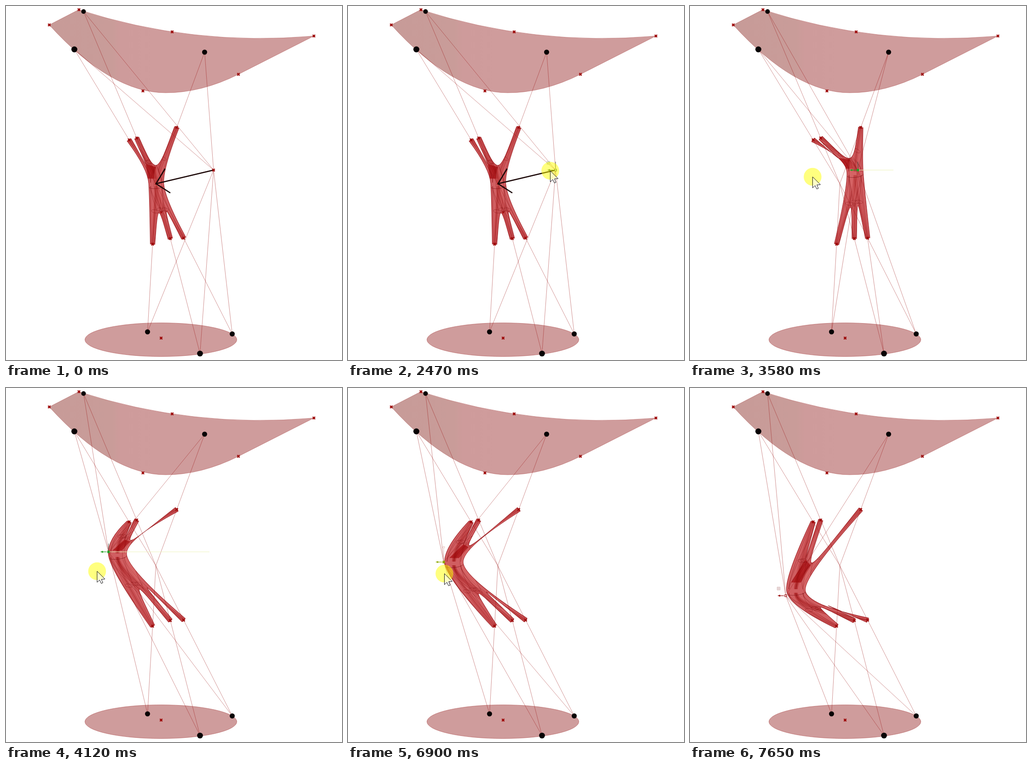
An HTML page with a canvas that plays this animation: 730 by 767 pixels, repeating every 8000 ms.

```html
<!DOCTYPE html>
<html>
<head>
<meta charset="utf-8">
<style>
html, body { margin: 0; width: 100%; height: 100%; overflow: hidden; background: #fff; }
canvas { display: block; }
</style>
</head>
<body>
<canvas id="stage" width="730" height="767"></canvas>
<script>
const g = document.getElementById('stage').getContext('2d');
const LOOP = 8000;
const RED = '#9c0404', THIN = 'rgba(150,8,8,.55)';

const center = [325.5, 385];
const anchors = [[148.5, 94], [168.5, 12], [431.5, 100], [491.5, 710.5], [421.5, 753], [307.5, 706]];
const anchorSize = [6.5, 5, 5.5, 5.5, 6.3, 5.5];
// clockwise: three upper limbs, then three lower ones
const tips = [[267.5, 290], [284, 286], [371, 263], [386, 503], [357, 504], [318.5, 516]];
const tipMean = [330.5, 393.7];
const canopyMarks = [[94, 41], [158.5, 8], [361, 56], [669, 65], [505, 148], [297.5, 184], [337, 719.5]];

// [time, x, y]
const cursorKeys = [[1490, 649, 453], [2270, 427, 357], [2400, 441, 357], [2540, 438, 357], [3580, 266.5, 370],
  [4120, 198, 397], [4260, 190, 398], [4720, 546, 442], [5600, 546, 442], [6340, 205, 335],
  [6410, 205, 336], [6900, 209.5, 402], [7300, 209, 430]];
const handleKeys = [[2470, 451, 355.5], [3100, 415, 355.5], [3580, 365, 355.5], [4120, 223, 355], [4190, 208, 355],
  [6410, 208, 355], [6900, 208, 377], [7250, 208, 420], [7640, 208, 450]];

const lerp = (a, b, k) => [a[0] + (b[0] - a[0]) * k, a[1] + (b[1] - a[1]) * k];
const shift = (p, x, y) => [p[0] + x, p[1] + y];
const smooth = k => k * k * (3 - 2 * k);

function track(keys, t, ease = k => k) {
  if (t <= keys[0][0]) return keys[0].slice(1);
  for (let i = 1; i < keys.length; i++) {
    const a = keys[i - 1], b = keys[i];
    if (t < b[0]) return lerp(a.slice(1), b.slice(1), ease((t - a[0]) / (b[0] - a[0])));
  }
  return keys[keys.length - 1].slice(1);
}

function stroke(color, width = 1) {
  g.strokeStyle = color;
  g.lineWidth = width;
  g.stroke();
}

function line(points, color, width) {
  g.beginPath();
  points.forEach(p => g.lineTo(...p));
  stroke(color, width);
}

function disc(p, r, color) {
  g.beginPath();
  g.arc(...p, r, 0, 7);
  g.fillStyle = color;
  g.fill();
}

function cross(p, r = 2.6, width = 2.3) {
  line([shift(p, -r, -r), shift(p, r, r)], RED, width);
  line([shift(p, -r, r), shift(p, r, -r)], RED, width);
}

function drawSurfaces() {
  const shade = g.createLinearGradient(94, 0, 330, 0);
  shade.addColorStop(0, '#c79b98');
  shade.addColorStop(.58, '#c99c99');
  shade.addColorStop(.66, '#ce9b9b');
  shade.addColorStop(1, '#cf9c9c');
  g.beginPath();
  g.moveTo(94, 41);
  g.lineTo(158, 8);
  g.quadraticCurveTo(405, 88, 669, 65);
  g.lineTo(505, 148);
  g.quadraticCurveTo(425, 188, 347, 188);
  g.quadraticCurveTo(228, 188, 94, 41);
  g.fillStyle = shade;
  g.fill();
  stroke('rgba(165,60,60,.6)', .8);
  g.beginPath();
  g.ellipse(336.5, 723, 165, 36.5, 0, 0, 7);
  g.fillStyle = '#cf9c9c';
  g.fill();
  stroke('rgba(165,60,60,.7)', .8);
}

function drawBody(pull) {
  const hub = lerp(pull, tipMean, .18);
  const half = 16 + .04 * Math.hypot(hub[0] - tipMean[0], hub[1] - tipMean[1]);
  const left = shift(hub, -half, -2), right = shift(hub, half, -2);

  // both corners of a limb's end, in clockwise order
  const corners = tips.map(p => {
    const dx = hub[0] - p[0], dy = hub[1] - p[1], k = 5 / Math.hypot(dx, dy);
    return [shift(p, -dy * k, dx * k), shift(p, dy * k, -dx * k)]
      .sort((a, b) => 0) && [shift(p, dy * -k, dx * k), shift(p, dy * k, dx * -k)];
  });
  const fork = (i, k) => lerp(hub, lerp(tips[i], tips[i + 1], .5), k);
  const forks = { 0: fork(0, .45), 1: fork(1, .37), 3: fork(3, .5), 4: fork(4, .5) };

  const intoFork = (i, a, b) => {
    const k = [0, 1].map(n => (forks[i][n] - (a[n] + b[n]) / 8) * 4 / 3);
    g.bezierCurveTo(...k, ...k, ...b);
  };
  const aroundWaist = (waist, lean, end) => {
    g.quadraticCurveTo(waist[0] - lean, waist[1] - 32, ...waist);
    g.quadraticCurveTo(waist[0] + lean, waist[1] + 32, ...end);
  };

  g.beginPath();
  g.moveTo(...corners[0][0]);
  tips.forEach((_, i) => {
    const from = corners[i][1], to = corners[(i + 1) % 6][0];
    g.lineTo(...from);
    if (i === 2) aroundWaist(right, 2, to);
    else if (i === 5) {
      g.quadraticCurveTo(left[0] + 2, left[1] + 32, ...left);
      g.quadraticCurveTo(left[0] - 2, left[1] - 32, ...to);
    } else intoFork(i, from, to);
  });
  g.closePath();
  g.fillStyle = 'rgba(194,44,48,.76)';
  g.fill();
  stroke('rgba(150,14,18,.85)', 1.1);

  g.save();
  g.clip();
  g.beginPath();
  [forks[0], lerp(forks[1], hub, .1), lerp(hub, forks[1], .3), lerp(left, forks[0], .25)].forEach(p => g.lineTo(...p));
  g.fillStyle = 'rgba(165,8,12,.7)';
  g.fill();

  // shaded limbs with lengthwise mesh lines
  tips.forEach((tip, i) => {
    const sign = i < 3 ? -1 : 1;
    for (const side of [-1, 0, 1]) {
      const end = shift(hub, side * half * .75, sign * 4);
      g.beginPath();
      g.moveTo(...shift(tip, side * 2.6, 0));
      g.quadraticCurveTo(end[0], end[1] + sign * 30, ...end);
      if (!side) stroke('rgba(160,10,14,.2)', 8);
      stroke('rgba(130,8,12,.5)', .8);
    }
    const ring = lerp(tip, shift(hub, 0, sign * 25), .68);
    g.beginPath();
    g.ellipse(...ring, 8, 3.5, i === 2 ? .5 : .2, 0, 7);
    stroke('rgba(120,8,12,.5)', .8);
  });

  // spine highlight and waist seam
  const low = lerp(forks[3], forks[4], .5);
  g.beginPath();
  g.moveTo(...forks[1]);
  g.quadraticCurveTo(...right, ...low);
  g.quadraticCurveTo(...left, ...forks[1]);
  g.fillStyle = 'rgba(222,112,112,.35)';
  g.fill();
  stroke('rgba(130,8,12,.5)', .8);
  g.beginPath();
  g.ellipse(hub[0], hub[1] + 4, half, 5, -.1, 0, Math.PI);
  stroke('rgba(110,8,12,.65)', .9);
  g.restore();
}

function drawHandle(p, t) {
  if (t < 1180) return cross(p);
  const sideDrag = t >= 2500 && t < 4260, downDrag = t >= 6410 && t < 7640;
  const color = sideDrag ? '#23a023' : downDrag ? '#8ea800' : t >= 7640 ? '#9c1414' : '#3c6b28';
  if (sideDrag) line([p, [442, p[1]]], '#eef3bd', 1);
  if (t < 4260) line([shift(p, 0, -18), shift(p, 0, -4)], '#4b5148', 1);
  if (downDrag) {
    line([shift(p, 0, -29), p], 'rgba(180,100,100,.4)', 1);
    g.beginPath();
    g.arc(p[0], p[1] - 32, 2, 0, 7);
    stroke('#d9a9a0', .8);
  }
  line([shift(p, -4, 0), shift(p, -15, 0)], color, 1.2);
  g.beginPath();
  [[-18, 0], [-12, -2.2], [-12, 2.2]].forEach(d => g.lineTo(...shift(p, ...d)));
  g.fillStyle = color;
  g.fill();
  g.fillStyle = sideDrag || downDrag ? color : '#fff';
  g.fillRect(p[0] - 2, p[1] - 2, 4, 4);
  g.strokeStyle = color;
  g.lineWidth = 1.3;
  g.strokeRect(p[0] - 2, p[1] - 2, 4, 4);
  if (!sideDrag && !downDrag) {
    const [x, y] = shift(p, -18.5, -18.5);
    g.strokeStyle = t >= 7640 ? '#c9a4a4' : t < 2500 ? '#9fb6a0' : '#a9adc0';
    g.lineWidth = .9;
    g.strokeRect(x, y, 6, 6);
    line([[x + 3, y], [x + 3, y + 6]], g.strokeStyle, .8);
    line([[x, y + 3], [x + 6, y + 3]], g.strokeStyle, .8);
  }
}

function drawCursor(t) {
  if (t < 1490 || t >= 7640) return;
  const pressed = t >= 2400 && t < 4260 || t >= 6340;
  const p = track(cursorKeys, t, pressed ? undefined : smooth);
  if (pressed) disc(p, 19.3, 'rgba(255,255,0,.5)');
  g.beginPath();
  [[0, 0], [0, 24], [5.5, 19], [9, 26.5], [12.5, 25], [9.3, 17.5], [17, 17]].forEach(d => g.lineTo(...shift(p, ...d)));
  g.closePath();
  g.fillStyle = pressed ? 'rgba(255,255,255,.55)' : '#fff';
  g.fill();
  stroke('#111', 1);
}

function draw(t) {
  const handle = track(handleKeys, t), idle = t < 2500;
  g.clearRect(0, 0, 730, 767);
  drawSurfaces();
  drawBody(idle ? center : handle);
  anchors.forEach((a, i) => {
    line([a, tips[i], center], THIN, .8);
    line([a, handle], THIN, .8);
  });
  anchors.forEach((a, i) => disc(a, anchorSize[i], '#080304'));
  [...canopyMarks, ...tips].forEach(p => cross(p));
  if (idle) {
    cross(center, 2, 1.5);
    cross([337, 447], 2, 1.5);
    line([[451, 355.5], [326, 385]], '#1c0808', 2.8);
    line([[345.5, 352.5], [326, 385], [357, 405]], '#1c0808', 2.6);
  }
  drawHandle(handle, t);
  drawCursor(t);
}

function tick() {
  draw(performance.now() % LOOP);
  requestAnimationFrame(tick);
}
tick();
</script>
</body>
</html>
```
